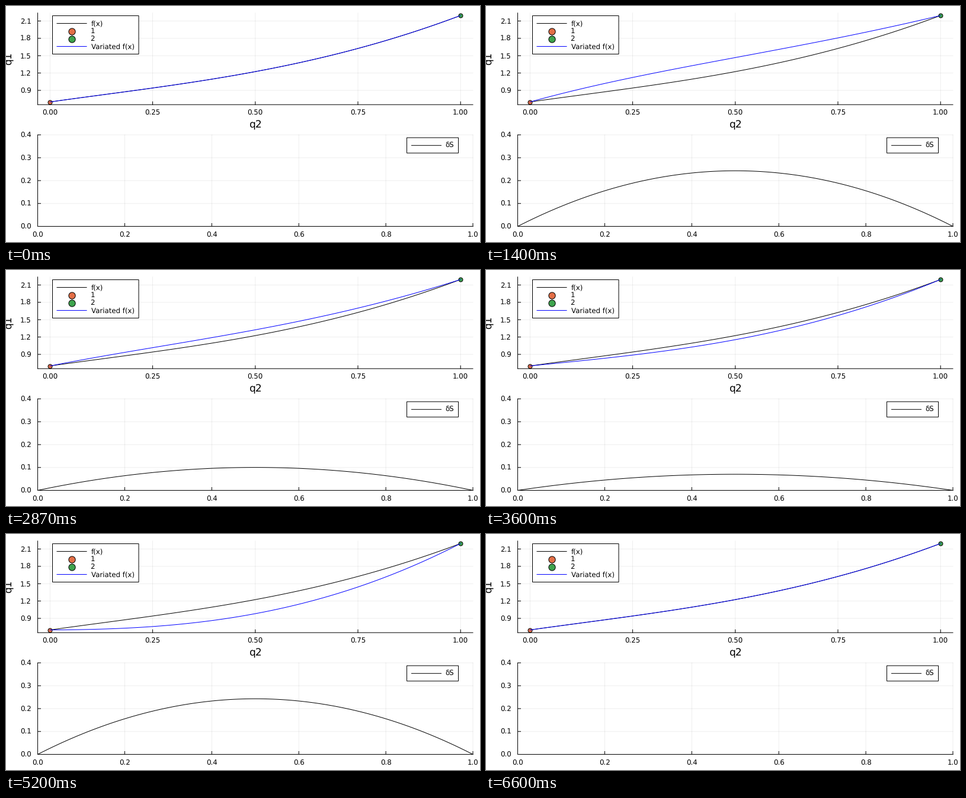
Recreate the animation shown at these times as a matplotlib script. Size 800 by 400 pixels, loop 6.67 s.

```python
import numpy as np
import matplotlib.pyplot as plt
from matplotlib.animation import FuncAnimation
from matplotlib.patches import Rectangle

W, H, DPI = 800, 400, 100
FRAMES = 100
PX = 72 / DPI                      # points per pixel
SMALL, LARGE = 11.75 * PX, 17 * PX
LEFT, RIGHT = 53.5, 788.0
ORANGE, GREEN = "#e36f47", "#3ea44e"

plt.rcParams.update({"font.family": "DejaVu Sans", "text.hinting": "none"})
fig = plt.figure(figsize=(W / DPI, H / DPI), dpi=DPI, facecolor="white")
ax = fig.add_axes([0, 0, 1, 1])
ax.set_xlim(0, W)
ax.set_ylim(H, 0)
ax.axis("off")


def line(xs, ys, color="black", z=3, **kw):
    return ax.plot(xs, ys, color=color, lw=PX, zorder=z, snap=False, **kw)[0]


def text(x, y, s, ha="center", size=SMALL):
    ax.text(x, y, s, ha=ha, va="baseline", fontsize=size, zorder=8)


def dot(x, y, radius, color, z):
    ax.plot([x], [y], "o", ms=2 * radius * PX, mfc=color, mec="black",
            mew=PX, zorder=z, snap=False)


def frame(top, bottom, xticks, yticks):
    """Grid, left and bottom axes, inward ticks and their labels."""
    for x, label in xticks:
        line([x, x], [top, bottom], z=1, alpha=0.065)
        line([x, x], [bottom, bottom - 5])
        text(x, bottom + 18, label)
    for y, label in yticks:
        line([LEFT, RIGHT], [y, y], z=1, alpha=0.065)
        line([LEFT, LEFT + 5], [y, y])
        text(42.5, y + 4.5, label, ha="right")
    line([LEFT, LEFT], [top, bottom])
    line([LEFT, RIGHT], [bottom, bottom])


def legend_box(x0, y0, x1, y1):
    ax.add_patch(Rectangle((x0, y0), x1 - x0, y1 - y0, fc="white", ec="black",
                           lw=PX, zorder=6, snap=False))


def x_top(q):
    return 74.3 + 692.9 * q


def y_top(q):
    return 143.0 - 98.0 * (q - 0.9)


def x_low(q):
    return LEFT + (RIGHT - LEFT) * q


def y_low(q):
    return 373.5 - 387.8 * q


frame(11.8, 167.2,
      [(x_top(v), f"{v:.2f}") for v in np.linspace(0, 1, 5)],
      [(y_top(v), f"{v:.1f}") for v in (0.9, 1.2, 1.5, 1.8, 2.1)])
text(421, 206.7, "q2", size=LARGE)
ax.text(8.6, 89.3, "q1", rotation=90, rotation_mode="anchor", ha="center",
        va="baseline", fontsize=LARGE, zorder=8)

frame(y_low(0.4), y_low(0),
      [(x_low(v), f"{v:.1f}") for v in np.linspace(0, 1, 6)],
      [(y_low(v), f"{v:.1f}") for v in np.linspace(0, 0.4, 5)])

# Path through five points, and the bump that varies it
t = np.linspace(0, 1, 101)
coef = np.polyfit(np.linspace(0, 1, 5), [0.7, 0.941, 1.2245, 1.625, 2.195], 4)
path = np.polyval(coef, t)
bump = t * (1 - t)

line(x_top(t), y_top(path), z=3)
dot(x_top(0), y_top(path[0]), 3.5, ORANGE, 4)
dot(x_top(1), y_top(path[-1]), 3.5, GREEN, 4)
varied = line(x_top(t), y_top(path), "blue", z=5)
delta = line(x_low(t), y_low(0 * t), z=5)

legend_box(78.5, 16.5, 224, 81.5)
rows = 29.5 + 13 * np.arange(4)
line([86, 136], [rows[0]] * 2, z=7)
dot(110.8, rows[1], 5.6, ORANGE, 7)
dot(110.8, rows[2], 5.6, GREEN, 7)
line([86, 136], [rows[3]] * 2, "blue", z=7)
for y, label in zip(rows, ("f(x)", "1", "2", "Variated f(x)")):
    text(142.3 if label.isdigit() else 143.5, y + 3.9, label, ha="left")

legend_box(676.5, 223.2, 763.5, 249.2)
line([684.5, 734.5], [236.3, 236.3], z=7)
text(741.5, 240.3, "δS", ha="left")


def update(k):
    amp = np.sin(2 * np.pi * k / (FRAMES - 1))
    varied.set_ydata(y_top(path + amp * bump))
    delta.set_ydata(y_low(abs(amp) * bump))
    return varied, delta


anim = FuncAnimation(fig, update, frames=FRAMES, interval=66.66, repeat=True,
                     repeat_delay=0, blit=False)
plt.show()
```
